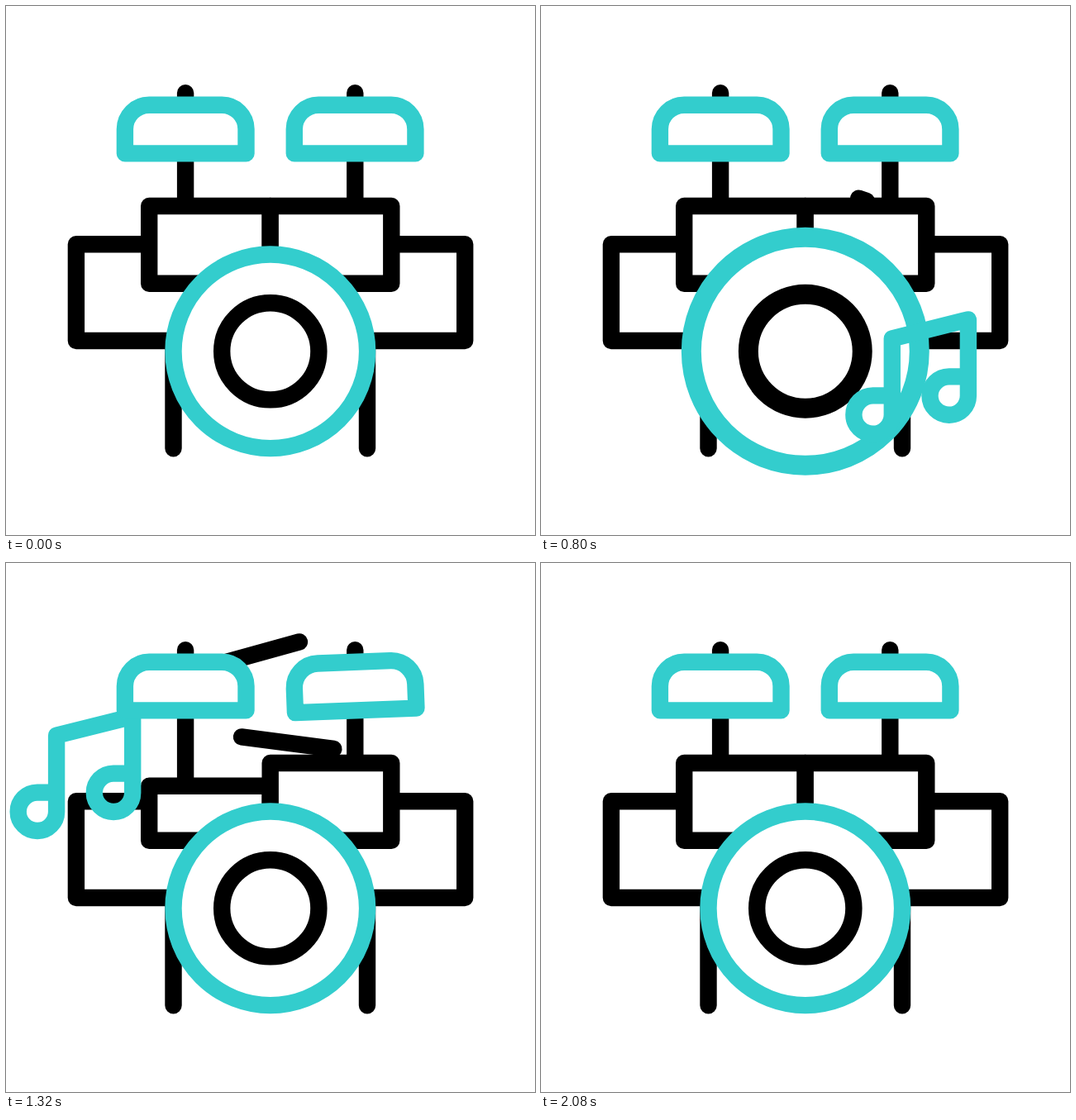
An HTML page that plays this animation: 640x640 px, repeating every 2400 ms.

```html
<!DOCTYPE html>
<html lang="en">
<head>
<meta charset="utf-8">
<title>Drum kit</title>
<style>
  html, body { margin: 0; width: 100%; height: 100%; overflow: hidden; background: #fff; }
  svg { display: block; width: 100%; height: 100%; }
  .ink, .teal { fill: none; stroke: #000; stroke-width: 20.4; stroke-linecap: round; stroke-linejoin: round; }
  .teal { stroke: #33cdcd; }
  .solid { fill: #fff; }
</style>
</head>
<body>
<svg viewBox="0 0 640 640">
  <defs>
    <path id="cymbal" d="M-73.3 29.3V0A29.3 29.3 0 0 1-44-29.3H44A29.3 29.3 0 0 1 73.3 0V29.3Z"/>
    <path id="note" d="M401.5 406H424.8V429A23.2 23.2 0 1 1 401.5 406M424.8 429V337L516.9 314V406A23.2 23.2 0 1 1 493.6 383H516.9"/>
  </defs>
  <rect class="ink" x="84.9" y="288.3" width="470.3" height="116.7"/>
  <path class="ink" d="M202.5 405V535.2M437 405V535.2"/>
  <path class="ink" d="M217.1 105.2V265M422.3 105.2V242"/>
  <line class="ink" id="tomStick"/>
  <line class="ink" id="cymbalStick"/>
  <path class="ink solid" id="leftTom"/>
  <rect class="ink solid" x="319.7" y="242" width="146.6" height="93.7"/>
  <use class="teal" href="#note" id="leftNote"/>
  <use class="teal solid" href="#cymbal" transform="translate(217.2 149.1)"/>
  <use class="teal solid" href="#cymbal" id="rightCymbal"/>
  <g id="bass">
    <circle class="teal solid" r="117.3"/>
    <circle class="ink" r="58.6"/>
  </g>
  <use class="teal" href="#note" id="rightNote"/>
</svg>
<script>
const LOOP = 2400, STEP = 20;
const el = id => document.getElementById(id);
const clamp = x => Math.min(1, Math.max(0, x));
const smooth = (t, from, to) => {
  const x = clamp((t - from) / (to - from));
  return x * x * (3 - 2 * x);
};

// Eased value from a list of [time, value] keys.
function track(t, keys) {
  let value = keys[0][1];
  for (let i = 1; i < keys.length; i++) {
    const [from, a] = keys[i - 1], [to, b] = keys[i];
    if (t >= from) value = a + (b - a) * smooth(t, from, to);
  }
  return value;
}

const bassKeys = [
  [0, 1], [160, 1.18], [320, 1],
  [615, 1], [785, 1.18], [960, 1], [1120, 1.18], [1280, 1]
];
const tomKeys = [[1215, 242], [1315, 270], [1420, 242]];
const cymbalKeys = [[1285, 0], [1420, -13], [1580, 10], [1740, -13], [1900, 9], [2080, 0]];

// A stick is drawn from its handle to its head, swings about its middle
// and is wiped away in the same direction.
const sticks = [
  { id: "tomStick", x: 340.7, y: 217.7, half: 56.2, draw: [750, 1020], wipe: [1390, 1665],
    swing: [[1150, 198.9], [1265, 168.9], [1360, 198.9]] },
  { id: "cymbalStick", x: 301, y: 110.4, half: 56, draw: [850, 1070], wipe: [1520, 1760],
    swing: [[1070, -15.5], [1195, -50], [1320, -15.5], [1445, -50], [1570, -15.5], [1695, -50], [1820, -15.5]] }
];

const notes = [
  { id: "rightNote", start: 560, x: 0, bottom: 595, rise: 191 },
  { id: "leftNote", start: 1040, x: -363.7, bottom: 424.5, rise: 201 }
];
const NOTE_TIME = 600, FADE = 150, NOTE_BOTTOM = 462.4;

function drawStick(s, t) {
  const line = el(s.id);
  const head = smooth(t, ...s.draw), tail = smooth(t, ...s.wipe);
  const angle = track(t, s.swing) * Math.PI / 180;
  const put = (n, part) => {
    const d = (2 * part - 1) * s.half;
    line.setAttribute("x" + n, s.x + d * Math.cos(angle));
    line.setAttribute("y" + n, s.y + d * Math.sin(angle));
  };
  put(1, tail);
  put(2, head);
  line.style.display = head > tail ? "" : "none";
}

function drawNote(n, t) {
  const end = n.start + NOTE_TIME;
  const y = n.bottom - n.rise * smooth(t, n.start, end) - NOTE_BOTTOM;
  el(n.id).setAttribute("transform", `translate(${n.x} ${y})`);
  el(n.id).style.opacity = smooth(t, n.start, n.start + FADE) * (1 - smooth(t, end - FADE, end));
}

function draw(t) {
  el("bass").setAttribute("transform", `translate(319.8 417.8) scale(${track(t, bassKeys)})`);
  el("leftTom").setAttribute("d", `M173.2 ${track(t, tomKeys)}H319.7V335.7H173.2Z`);
  el("rightCymbal").setAttribute("transform", `translate(422.1 149.1) rotate(${track(t, cymbalKeys)})`);
  sticks.forEach(s => drawStick(s, t));
  notes.forEach(n => drawNote(n, t));
}

const begin = performance.now();
function tick() {
  const t = (performance.now() - begin) % LOOP;
  draw(Math.floor(t / STEP) * STEP);
  requestAnimationFrame(tick);
}
draw(0);
requestAnimationFrame(tick);
</script>
</body>
</html>
```
